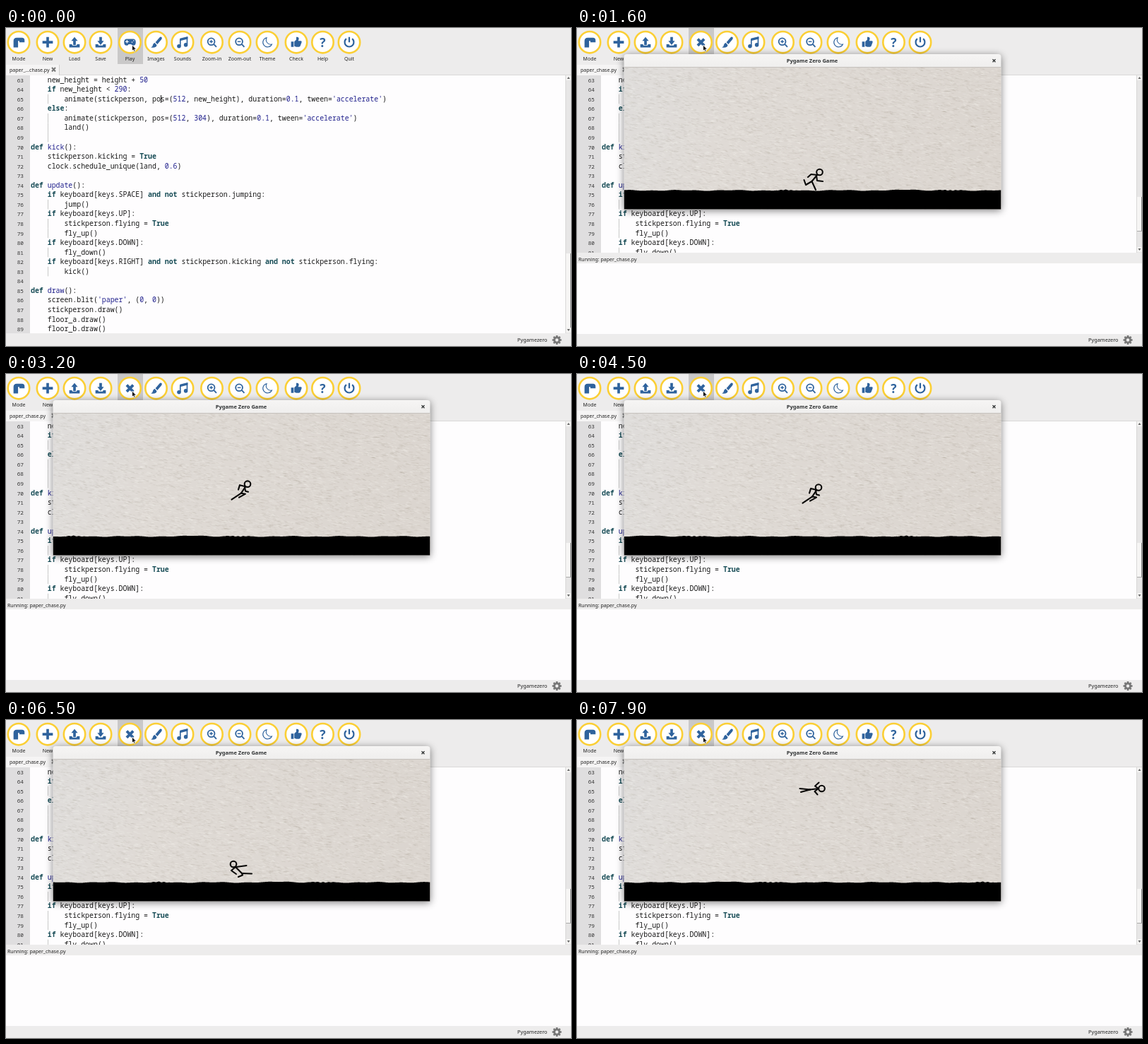
An HTML page with a canvas that plays this animation: 800x450 px, repeating every 8000 ms.

```html
<!DOCTYPE html>
<html lang="en">
<head>
<meta charset="utf-8">
<title>Editor and game</title>
<style>
html, body { margin: 0; width: 100%; height: 100%; overflow: hidden; }
canvas { display: block; }
</style>
</head>
<body>
<canvas id="stage" width="800" height="450"></canvas>
<script>
const LOOP = 8000, RUN_AT = 500, OPEN_AT = 1000, SPEED = 0.125;
const LEFT = 66.5, W = 534, H = 219.6, BAR = 19, PERIOD = 533;
const UI = '"Noto Sans", "Open Sans", sans-serif';
const MONO = '"Noto Sans Mono", "DejaVu Sans Mono", monospace';
const BLUE = '#2f639d', TAU = Math.PI * 2;
const c = document.getElementById('stage').getContext('2d');

function rect(x, y, w, h, color) {
  c.fillStyle = color;
  c.fillRect(x, y, w, h);
}
function text(s, x, y, font, color = '#222', align = 'left') {
  c.font = font;
  c.fillStyle = color;
  c.textAlign = align;
  c.fillText(s, x, y);
}
function circle(x, y, r) {
  c.beginPath();
  c.arc(x, y, r, 0, TAU);
}
function line(...p) {
  c.beginPath();
  for (let i = 0; i < p.length; i += 2) c.lineTo(p[i], p[i + 1]);
  c.stroke();
}
const fill = d => c.fill(new Path2D(d));
const stroke = d => c.stroke(new Path2D(d));

// Toolbar icons, drawn around (0, 0)
const tray = () => fill('M-8 3h4l1 2h6l1-2h4v5h-16z');
const lens = d => () => {
  c.lineWidth = 2;
  stroke('M4.3-1a5.3 5.3 0 1 1-10.6 0a5.3 5.3 0 1 1 10.6 0M3 3l4 4.3');
  c.lineWidth = 1.5;
  stroke(d);
};
const icons = {
  mode: () => fill('M-8 8v-10q0-5 5-5h8q4 0 4 4v3h-8v-2h-2v10z'),
  plus: () => fill('M-2-8h4v6h6v4h-6v6h-4v-6h-6v-4h6z'),
  load: () => { tray(); fill('M0-8l5 6h-3v6h-4v-6h-3z'); },
  save: () => { tray(); fill('M-2-8h4v6h3l-5 6-5-6h3z'); },
  pad: () => {
    fill('M-5-5h10q4 0 4 5q0 5-4 5q-2 0-3-2h-4q-1 2-3 2q-4 0-4-5q0-5 4-5z');
    c.strokeStyle = '#fff';
    c.lineWidth = 1.3;
    stroke('M-7-1h5M-4.5-3.5v5M2.5 0h1.5M5-2.5h1.5');
  },
  stop: () => { c.lineWidth = 4.2; stroke('M-5-5L5 5M5-5L-5 5'); },
  brush: () => fill('M8-8q2 1 0 4l-6 7-3-3 6-7q2-2 3-1zM-2 1l3 3q0 5-9 4q3-1 3-4q1-3 3-3z'),
  note: () => {
    fill('M-4-6L8-9v4L-4-2z');
    c.lineWidth = 1.8;
    stroke('M-3.5-5v11M7-8v11');
    circle(-5.5, 6, 3); c.fill();
    circle(5, 4, 3); c.fill();
  },
  zoomIn: lens('M-3.5-1h5M-1-3.5v5'),
  zoomOut: lens('M-3.5-1h5'),
  moon: () => { c.lineWidth = 1.2; stroke('M-1-7a7.2 7.2 0 1 0 8 10a7 7 0 0 1-8-10z'); },
  thumb: () => fill('M-8-1h4v8h-4zM-3-1l3-3v-4q4-1 4 3l-1 3h4q2 0 1 3l-2 5q-1 1-2 1h-4l-3-1z'),
  help: () => text('?', 0, 7, `bold 19px ${UI}`, BLUE, 'center'),
  power: () => { c.lineWidth = 2.4; stroke('M-4.5-5.5a7 7 0 1 0 9 0M0-8v8'); }
};
const tools = [
  [18, 'Mode', 'mode'], [59, 'New', 'plus'], [97, 'Load', 'load'], [134, 'Save', 'save'],
  [175.5, 'Play', 'pad'], [212.5, 'Images', 'brush'], [250, 'Sounds', 'note'],
  [291.5, 'Zoom-in', 'zoomIn'], [331, 'Zoom-out', 'zoomOut'], [370, 'Theme', 'moon'],
  [411, 'Check', 'thumb'], [448.5, 'Help', 'help'], [486, 'Quit', 'power']
];

const code = `    new_height = height + 50
    if new_height < 290:
        animate(stickperson, pos=(512, new_height), duration=0.1, tween='accelerate')
    else:
        animate(stickperson, pos=(512, 304), duration=0.1, tween='accelerate')
        land()

def kick():
    stickperson.kicking = True
    clock.schedule_unique(land, 0.6)

def update():
    if keyboard[keys.SPACE] and not stickperson.jumping:
        jump()
    if keyboard[keys.UP]:
        stickperson.flying = True
        fly_up()
    if keyboard[keys.DOWN]:
        fly_down()
    if keyboard[keys.RIGHT] and not stickperson.kicking and not stickperson.flying:
        kick()

def draw():
    screen.blit('paper', (0, 0))
    stickperson.draw()
    floor_a.draw()
    floor_b.draw()`.split('\n');
const token = /\b(?:def|if|else|and|not|True)\b|'[^']*'|\b\d+(?:\.\d+)?\b|[^\s]/g;
const CH = 5.93;

function drawCode(running) {
  const bottom = running ? 318 : 432;
  c.save();
  c.beginPath();
  c.rect(0, 67, 800, bottom - 67);
  c.clip();
  rect(0, 67, 800, 366, '#fefdfe');
  rect(0, 67, 34, 366, '#dfdedf');
  code.forEach((s, i) => {
    const y = 76.6 + i * 13.56;
    text(63 + i, 25, y, `7.8px ${MONO}`, '#333', 'right');
    if (s.startsWith('        ') || i === 6) rect(59, y - 10, 1, 13.56, '#c9c9c9');
    for (const m of s.matchAll(token)) {
      const word = /^(def|if|else|and|not|True)$/.test(m[0]);
      const name = s.startsWith('def ') && m.index > 3 && m.index < s.indexOf('(');
      const literal = /^['\d]/.test(m[0]);
      const color = word ? '#164b55' : name || literal ? '#20208c' : '#191919';
      text(m[0], 35 + m.index * CH, y, `${word ? '600 ' : ''}9.88px ${MONO}`, color);
    }
  });
  if (!running) rect(219, 95, 1, 11, '#111');
  c.restore();

  rect(793, 67, 7, bottom - 67, '#e7e6e6');
  rect(792, 67, 1, bottom - 67, '#d8d7d6');
  const [top, h] = running ? [239, 48] : [319, 106];
  rect(793, top, 6, h, '#f7f6f5');
  rect(799, top, 1, h, '#888');
  rect(793, top + h, 7, 1, '#aaa');
  for (const y of [67, bottom - 8]) rect(793, y, 7, 7, '#f5f4f3');
  c.fillStyle = '#666';
  fill('M794.5 72l2-3 2 3z');
  fill(`M794.5 ${bottom - 6}l2 3 2-3z`);
}

function drawEditor(running) {
  rect(0, 0, 800, 450, '#edecec');
  rect(158, 0, 36, 51, '#c9c8c8');
  for (const [x, label, icon] of tools) {
    const stop = running && label === 'Play';
    c.save();
    c.translate(x, 20.2);
    circle(0, 0, 15.2);
    c.fillStyle = '#fff';
    c.fill();
    c.strokeStyle = '#fbcf35';
    c.lineWidth = 2.6;
    c.stroke();
    c.scale(0.92, 0.92);
    c.fillStyle = c.strokeStyle = BLUE;
    icons[stop ? 'stop' : icon]();
    c.restore();
    text(stop ? 'Stop' : label, x, 45.6, `7px ${UI}`, '#222', 'center');
  }
  rect(0, 66, 800, 1, '#dad9d8');
  rect(0, 52, 75, 15, '#f5f4f4');
  rect(75, 52, 1, 15, '#d0cfce');
  text(running ? 'paper_chase.py' : 'paper_…chase.py', 5, 61.5, `7px ${UI}`);
  c.strokeStyle = '#777';
  c.lineWidth = 2;
  stroke('M65 56l5 5.5M70 56l-5 5.5');

  drawCode(running);
  if (running) {
    rect(0, 318, 800, 15, '#edecec');
    text('Running: paper_chase.py', 2, 329.5, `7px ${UI}`);
    rect(0, 333, 800, 100, '#fefdfe');
  }
  rect(0, 433, 800, 17, '#edecec');
  text('Pygamezero', 766.5, 444, `7.3px ${UI}`, '#222', 'right');
  c.save();
  c.translate(780, 441.5);
  c.fillStyle = '#777';
  for (let i = 0; i < 8; i++) {
    c.rotate(TAU / 8);
    c.fillRect(-1.3, -6.5, 2.6, 4);
  }
  c.strokeStyle = '#777';
  c.lineWidth = 2.6;
  circle(0, 0, 3.6);
  c.stroke();
  c.restore();
}

function drawCursor() {
  c.fillStyle = '#111';
  c.strokeStyle = '#fff';
  c.lineWidth = 0.8;
  const arrow = 'M178.5 24v8.5l1.9-1.8 1.3 3 1.5-.7-1.3-2.9h2.6z';
  fill(arrow);
  stroke(arrow);
}

// Paper with faint fibres
const paper = document.createElement('canvas');
paper.width = W;
paper.height = 201;
{
  const p = paper.getContext('2d');
  let seed = 7;
  const rnd = () => (seed = seed * 16807 % 2147483647) / 2147483647;
  const g = p.createLinearGradient(0, 0, W, 150);
  g.addColorStop(0, '#dfdddb');
  g.addColorStop(0.3, '#dfdad5');
  g.addColorStop(1, '#dbd5cf');
  p.fillStyle = g;
  p.fillRect(0, 0, W, H);
  for (let i = 0; i < 9000; i++) {
    const x = rnd() * W, y = rnd() * H, w = 2 + rnd() * 5;
    p.strokeStyle = i % 2 ? 'rgba(255,253,250,.24)' : 'rgba(120,105,92,.12)';
    p.lineWidth = 0.8;
    p.beginPath();
    p.moveTo(x, y);
    p.quadraticCurveTo(x + w / 2, y + rnd() * 2 - 1, x + w, y + rnd() * 2);
    p.stroke();
  }
}

// Head position, then limbs as polylines
const poses = {
  runA: [[343, 204], [340, 208, 333, 216], [324, 206, 339, 208], [339, 209, 342, 216, 349, 212],
    [317, 215, 326, 219, 333, 215], [333, 215, 336, 220, 337.5, 228]],
  runB: [[343.5, 204], [340, 208, 332.5, 217], [327, 211, 331.5, 207, 340, 208],
    [339, 209, 340, 216, 348, 217], [321.5, 215, 324, 222, 332.5, 217], [332.5, 217, 338, 229]],
  jump: [[342, 156], [339, 160, 333, 169], [329, 164, 331, 157.5, 339, 159.5],
    [338, 160, 339, 166, 343, 167], [319.5, 178, 333, 169], [333, 169, 339, 170, 330, 175]],
  kick: [[322, 204], [325, 208, 334, 217], [326, 208, 340.5, 206], [325, 208, 319, 213, 326, 218],
    [334, 217, 348, 217.5], [334, 217, 335, 219.5, 329, 222]],
  fly: [[346.5, 97], [342, 97, 330, 98.5], [342, 97, 337, 93.5, 342.5, 88.5],
    [342, 97, 336.5, 101, 340.5, 105.5], [330, 98.5, 315.5, 97], [330, 98.5, 317, 102]]
};

function figureAt(t) {
  if (t >= 7000) return ['fly', (7900 - t) * 0.119];
  for (const start of [2770, 4015]) {
    const u = (t - start) / 700;
    if (u >= 0 && u < 1) return ['jump', 48 - 204 * u * (1 - u)];
  }
  if (t >= 5600 && t < 6200 || t >= 6300 && t < 6900) return ['kick', 0];
  return [Math.floor(t / 100) % 2 ? 'runA' : 'runB', 0];
}

function drawFigure(t) {
  const [name, dy] = figureAt(t);
  const [head, ...limbs] = poses[name];
  c.save();
  c.translate(0, dy);
  c.strokeStyle = '#080706';
  c.lineWidth = 2.1;
  c.lineCap = c.lineJoin = 'round';
  circle(...head, 4.3);
  c.stroke();
  for (const limb of limbs) line(...limb);
  c.restore();
}

function groundY(u) {
  u = ((u % PERIOD) + PERIOD) % PERIOD;
  const a = u * TAU / PERIOD;
  const near = (m, w) => Math.exp(-(((u - m) / w) ** 2));
  return 229.8 + 0.4 * Math.sin(7 * a) + 0.35 * Math.sin(17 * a + 1) - 1.2 * near(385, 16)
    + 0.5 * Math.sin(71 * a) * (near(210, 13) + near(440, 16));
}

function drawWindow(t) {
  let scale = 1, x = 333.5, y = 146.5;
  c.save();
  if (t < 1300) {
    scale = Math.min(1, 0.8 + (t - OPEN_AT) / 1000);
    x = 308.5;
    y = 143;
    c.globalAlpha = [0.55, 0.94, 1][(t - OPEN_AT) / 100];
  }
  c.translate(x, y);
  c.scale(scale, scale);
  c.translate(-333.5, -146.5);

  c.shadowColor = 'rgba(0,0,0,.5)';
  c.shadowBlur = 11;
  c.shadowOffsetY = 2;
  c.beginPath();
  c.roundRect(LEFT, 37, W, H, [4, 4, 0, 0]);
  const g = c.createLinearGradient(0, 37, 0, 56);
  g.addColorStop(0, '#f6f5f4');
  g.addColorStop(1, '#efeeed');
  c.fillStyle = g;
  c.fill();
  c.shadowColor = 'transparent';
  c.clip();
  text('Pygame Zero Game', 333, 48.7, `600 7.5px ${UI}`, '#303334', 'center');
  c.strokeStyle = '#303334';
  c.lineWidth = 1.3;
  stroke('M588.5 44.3l4 4M592.5 44.3l-4 4');
  c.drawImage(paper, LEFT, 37 + BAR);
  rect(LEFT, 55, W, 1, '#c6c2be');

  c.beginPath();
  c.moveTo(LEFT, 257);
  for (let px = LEFT; px <= LEFT + W; px++) c.lineTo(px, groundY(px + SPEED * (t - 2300)));
  c.lineTo(LEFT + W, 257);
  c.fillStyle = '#000';
  c.fill();
  drawFigure(t);
  c.restore();
}

function frame(now) {
  const t = Math.floor(now % LOOP / 100) * 100;
  drawEditor(t >= RUN_AT);
  if (t >= OPEN_AT) drawWindow(t);
  drawCursor();
  requestAnimationFrame(frame);
}
requestAnimationFrame(frame);
</script>
</body>
</html>
```
